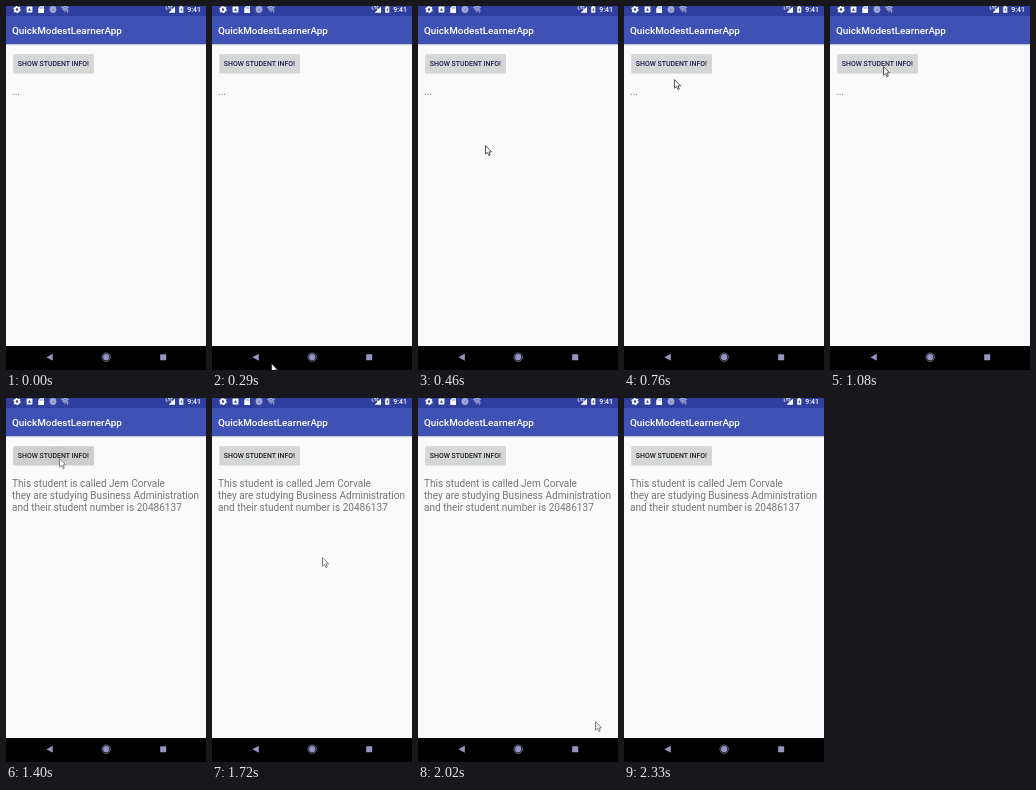
Animation, 200 px wide and 364 px high, one loop 2.8 s. Source, as an HTML page:

```html
<!DOCTYPE html>
<html lang="en">
<head>
<meta charset="utf-8">
<title>Student info</title>
<style>
  html, body { margin: 0; width: 100%; height: 100%; overflow: hidden; background: #fafafa; }
  svg { display: block; width: 100%; height: 100%; font-family: Roboto, "Open Sans", sans-serif; }
  .medium { font-weight: 500; }
  .body { font-size: 10.04px; fill: #757575; }
</style>
</head>
<body>
<svg viewBox="0 0 200 364">
  <defs>
    <linearGradient id="shade" x2="0" y2="1">
      <stop stop-color="#b9bccd"/>
      <stop offset="1" stop-color="#fafafa"/>
    </linearGradient>
    <clipPath id="face"><rect x="7.5" y="48.2" width="80.3" height="18.9" rx="1"/></clipPath>
  </defs>

  <rect width="200" height="364" fill="#fafafa"/>
  <rect y="38" width="200" height="2" fill="url(#shade)"/>
  <rect y="9" width="200" height="29" fill="#3f51b5"/>
  <rect width="200" height="10" fill="#303f9f"/>

  <g id="status" fill="#fff">
    <circle cx="11" cy="3.5" r="2.1" fill="none" stroke="#fff" stroke-width="1.7"/>
    <circle cx="11" cy="3.5" r="3.2" fill="none" stroke="#fff" stroke-width="1.1" stroke-dasharray="1.7 1.65"/>
    <rect x="20.6" y="0.6" width="5.8" height="6" rx=".6"/>
    <path d="M23.5 2 25 4.8H22Z" fill="#303f9f"/>
    <path d="M34 .2H38V7H32.3V2Z"/>
    <path d="M34.3 1.3V2.8M35.6 1.3V2.8M36.9 1.3V2.8" stroke="#303f9f" stroke-width=".5"/>
    <circle cx="47" cy="3.5" r="3.4" fill="#a3a9d4"/>
    <circle cx="47.4" cy="3.9" r="1.4" fill="#8790c7"/>
    <path d="M55 1.4Q59 -1.4 63 1.4L59 6.8Z" fill="#7680bf"/>
    <path d="M55.2 1.6Q59 -1 62.8 1.6M56.7 3.6Q59 2 61 3.4M60.6 4.2Q62.8 3.2 62 5L61.4 6.9"
          fill="none" stroke="#b3b8de" stroke-width=".8"/>
    <path d="M169 .4V6.8H162.6Z"/>
    <path d="M160.2 .4V3.2H161.6M162 .6H164.2M163.1 .6V3.2M166.6 .6H165V3.2H166.6" fill="none" stroke="#fff" stroke-width=".7"/>
    <path d="M174.4 0H176.1V.7H177.3V6.8H173.2V.7H174.4Z"/>
    <path d="M175.7 1.8 174.3 4.2H175.2V5.9L176.4 3.5H175.7Z" fill="#303f9f"/>
    <text class="medium" x="181.3" y="6.2" font-size="6.9">9:41</text>
  </g>

  <text class="medium" x="6" y="27.8" font-size="9.9" fill="#fff">QuickModestLearnerApp</text>

  <rect x="7.2" y="48.4" width="80.9" height="19.4" rx="1.4" fill="#dcdcde"/>
  <rect id="button" x="7.5" y="48.2" width="80.3" height="18.9" rx="1"/>
  <g clip-path="url(#face)"><circle id="ripple" cx="52" cy="58" r="10"/></g>
  <text id="label" class="medium" x="11.8" y="60.2" font-size="6.95">SHOW STUDENT INFO!</text>

  <text id="empty" class="body" x="6" y="89.2">...</text>
  <g id="info" class="body">
    <text x="6" y="89.2">This student is called Jem Corvale</text>
    <text x="6" y="100.9">they are studying Business Administration</text>
    <text x="6" y="112.6">and their student number is 20486137</text>
  </g>

  <rect y="340" width="200" height="24" fill="#000"/>
  <g fill="#9596c3">
    <path d="M40.4 351.2 46.8 347.7V354.7Z"/>
    <circle cx="100.2" cy="351.2" r="3.1"/>
    <circle cx="100.2" cy="351.2" r="4.2" fill="none" stroke="#9596c3" stroke-width=".7"/>
    <rect x="154.2" y="348.2" width="6" height="6" rx=".4"/>
  </g>

  <path id="cursor" d="M.5 .6V9.2L2.5 7.4 3.9 10.6 5.3 10 3.9 6.9H6.6Z"
        fill="#fff" stroke-width=".8" stroke-linejoin="round"/>
</svg>
<script>
const LOOP = 2800, TAP = 1230, RELEASE = 1400, SETTLED = 1720;

// The pointer jumps from stop to stop: [time, x, y]; no position means hidden.
const stops = [
  [0], [290, 59, 357], [460, 67, 139], [610, 54.5, 104.5], [760, 50, 73],
  [930, 53, 62.5], [1080, 53, 60], [1720, 110, 159], [1870, 178, 273.5],
  [2020, 177, 323], [2180, 163, 357], [2330]
];

const el = id => document.getElementById(id);
const set = (id, attrs) => {
  for (const name in attrs) el(id).setAttribute(name, attrs[name]);
};
const show = (id, on) => set(id, { visibility: on ? "visible" : "hidden" });

function render(t) {
  const [, x, y] = stops.findLast(stop => stop[0] <= t);
  const tapped = t >= TAP;
  const pressed = tapped && t < SETTLED;

  show("cursor", x !== undefined);
  if (x !== undefined) {
    set("cursor", { transform: `translate(${x} ${y})`, stroke: tapped ? "#66666a" : "#2c2c34" });
  }
  show("empty", !tapped);
  show("info", tapped);
  set("label", { fill: tapped ? "#202020" : "#211d4d" });
  set("button", { fill: pressed ? "#cecece" : "#d5d6d6" });
  set("ripple", { opacity: !pressed ? 0 : t < RELEASE ? 0.04 : 0.03 });
}

const start = performance.now();
function tick() {
  render((performance.now() - start) % LOOP);
  requestAnimationFrame(tick);
}
tick();
</script>
</body>
</html>
```
